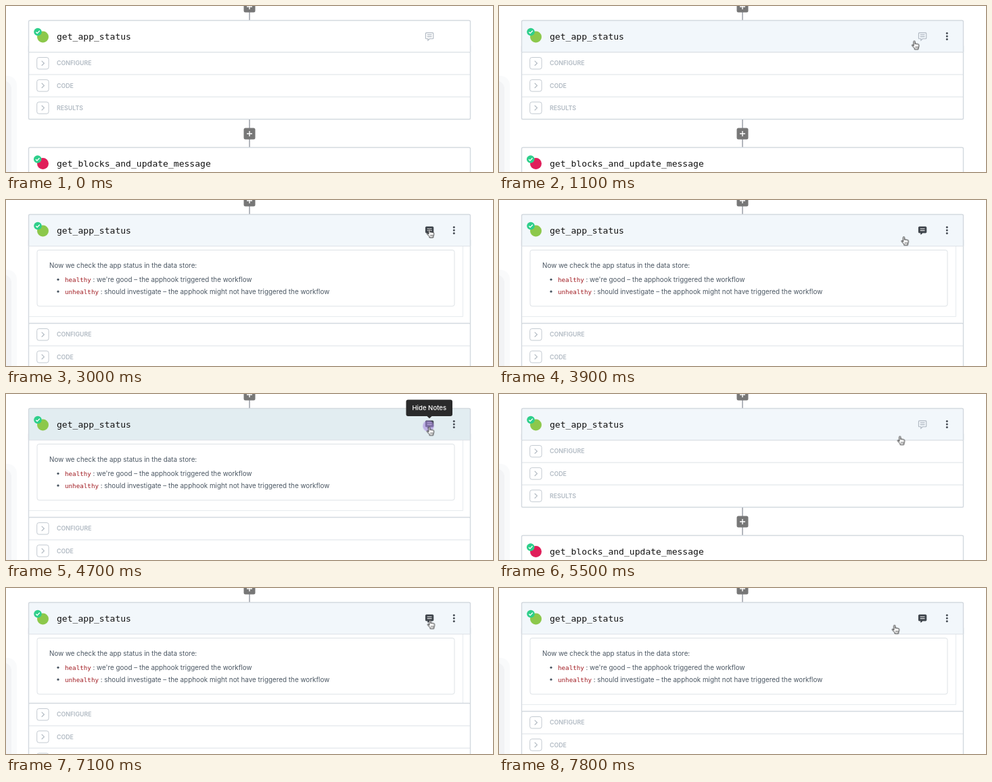
Animation of 720 by 247 pixels, one loop 8 s. Source, as an HTML page:

```html
<!DOCTYPE html>
<html lang="en">
<head>
<meta charset="utf-8">
<title>Step notes toggle</title>
<style>
html, body { margin: 0; width: 100%; height: 100%; overflow: hidden; background: #fff; }
svg { display: block; width: 720px; height: 247px; }
text { font-family: Inter, Roboto, sans-serif; }
.mono { font-family: "DejaVu Sans Mono", "Noto Sans Mono", monospace; }
.title { font-size: 13.06px; fill: #111; }
.label { font-size: 8.8px; font-weight: 600; fill: #b1bac3; }
.note { font-size: 9.85px; fill: #4b5763; }
.code { font-size: 9.24px; fill: #a11c22; }
.tip text { font-size: 9.6px; font-weight: 500; fill: #fff; text-anchor: middle; }
.tip rect, .tip path { fill: #2a2a2b; }
.card { fill: #fff; stroke: #d3d9df; stroke-width: 1.4; }
.rule { stroke: #dce1e6; }
.link { stroke: #9a9fa7; stroke-width: 1.5; }
.plus rect { fill: #777; }
.plus path { stroke: #fff; stroke-width: 1.4; }
.line { fill: none; stroke: #c3cad1; }

/* 100 ms is 1.25% of the loop */
.header, .rows, .closed, .open, .kebab, .press, .show, .hide, .cursor {
  animation: 8s step-end infinite;
}
.header { animation-name: header; }
.rows { animation-name: rows; }
.closed { animation-name: closed; }
.open { animation-name: open; }
.kebab { animation-name: kebab; }
.press { animation-name: press; }
.show { animation-name: show; }
.hide { animation-name: hide; }
.cursor { animation-name: cursor; animation-timing-function: steps(6); }

@keyframes header {
  0% { fill: #fff; }
  3.75%, 27.5%, 61.25%, 87.5%, 100% { fill: #f2f7fb; }
  25%, 58.75%, 85% { fill: #e2edf1; }
}
@keyframes rows {
  0%, 63.75% { transform: translateY(0); }
  27.5%, 87.5% { transform: translateY(60px); }
  28.75%, 88.75% { transform: translateY(103px); }
  30%, 90%, 100% { transform: translateY(115px); }
  61.25% { transform: translateY(55px); }
  62.5% { transform: translateY(12px); }
}
@keyframes closed {
  0%, 61.25% { opacity: 1; }
  27.5%, 87.5%, 100% { opacity: 0; }
}
@keyframes open {
  0%, 61.25% { opacity: 0; }
  27.5%, 87.5%, 100% { opacity: 1; }
}
@keyframes kebab {
  0% { opacity: 0; }
  3.75%, 100% { opacity: 1; }
}
@keyframes press {
  0%, 27.5%, 61.25%, 87.5%, 100% { opacity: 0; }
  25%, 58.75%, 85% { opacity: .6; }
}
@keyframes show {
  0%, 27.5%, 87.5%, 100% { opacity: 0; }
  15%, 78.75% { opacity: 1; }
}
@keyframes hide {
  0%, 61.25%, 100% { opacity: 0; }
  51.25% { opacity: 1; }
}
@keyframes cursor {
  0% { transform: translate(760px, 59px); animation-timing-function: step-end; }
  2.5% { transform: translate(701px, 59px); animation-timing-function: steps(5); }
  8.75%, 10% { transform: translate(598px, 60px); }
  17.5% { transform: translate(621.5px, 43px); }
  37.5% { transform: translate(621.5px, 43px); animation-timing-function: steps(5); }
  43.75%, 45% { transform: translate(567px, 60px); }
  52.5% { transform: translate(621.5px, 48.5px); }
  67.5% { transform: translate(621.5px, 48.5px); animation-timing-function: step-end; }
  68.75% { transform: translate(588.5px, 62.5px); animation-timing-function: step-end; }
  70%, 72.5% { transform: translate(578px, 62.5px); }
  80% { transform: translate(622.5px, 47.5px); }
  90% { transform: translate(622.5px, 47.5px); animation-timing-function: steps(4); }
  95% { transform: translate(583px, 56px); animation-timing-function: step-end; }
  96.25% { transform: translate(581.5px, 55.2px); animation-timing-function: step-end; }
  97.5%, 100% { transform: translate(580.5px, 54.8px); }
}
</style>
</head>
<body>
<svg viewBox="0 0 720 247" xmlns="http://www.w3.org/2000/svg">
  <defs>
    <g id="plus" class="plus">
      <rect x="-8.5" y="-8.5" width="17" height="17" rx="2.5"/>
      <path d="M-4 0H4M0-4V4"/>
    </g>
    <g id="check">
      <circle r="5.8" fill="#2ecf8b"/>
      <path d="M-2.7 .2L-.8 2.1 2.8-1.8" fill="none" stroke="#fff" stroke-width="1.4"/>
    </g>
    <g id="toggle" class="line">
      <rect x="45.7" y="-8.7" width="17.4" height="17.4" rx="3"/>
      <path d="M52.7-3.6L56.4 0 52.7 3.6" stroke="#b4bcc4" stroke-width="1.2"/>
    </g>
    <path id="bubble" d="M621.4 39.9H630.8Q631.8 39.9 631.8 40.9V47.8Q631.8 48.8 630.8 48.8H626.3L623.8 51.2V48.8H621.4Q620.4 48.8 620.4 47.8V40.9Q620.4 39.9 621.4 39.9Z"/>
    <path id="lines" d="M622.7 42.9H629.5M622.7 45.6H629.5"/>
  </defs>

  <rect x="-40" y="104" width="56" height="180" rx="14" fill="#f9fafb"/>
  <rect x="-40" y="111" width="48" height="180" rx="12" fill="#f2f3f5"/>

  <!-- notes, uncovered as the rows slide down -->
  <rect class="card" x="33.5" y="60" width="653" height="126"/>
  <path d="M675.5 69V173.5H34" fill="none" stroke="#e7ebee"/>
  <rect x="46" y="74.5" width="617" height="83.5" rx="3" fill="#fff" stroke="#dde2e6"/>
  <text class="note" x="64" y="100.7">Now we check the app status in the data store:</text>
  <circle cx="77" cy="118.3" r="1.6" fill="#4b5763"/>
  <text class="mono code" x="87" y="121.7">healthy</text>
  <text class="note" x="128.5" y="121.7">: we're good – the apphook triggered the workflow</text>
  <circle cx="77" cy="136.2" r="1.6" fill="#4b5763"/>
  <text class="mono code" x="87" y="139.5">unhealthy</text>
  <text class="note" x="139.7" y="139.5">: should investigate – the apphook might not have triggered the workflow</text>

  <g class="rows">
    <rect x="30" y="69" width="660" height="300" fill="#fff"/>
    <rect class="card" x="33.5" y="68.5" width="653" height="100" rx="1.5"/>
    <path class="rule" d="M34 102H686M34 135.2H686"/>
    <use href="#toggle" y="85.2"/>
    <use href="#toggle" y="118.4"/>
    <use href="#toggle" y="151.6"/>
    <text class="label" x="75" y="88.4">CONFIGURE</text>
    <text class="label" x="75" y="121.6">CODE</text>
    <text class="label" x="75" y="154.8">RESULTS</text>
    <path class="link" d="M360 169V210"/>
    <use href="#plus" x="360" y="190"/>
    <rect class="card" x="33.5" y="210.5" width="653" height="100" rx="2"/>
    <circle cx="54.5" cy="234.5" r="8.5" fill="#e01e5a"/>
    <use href="#check" x="46.7" y="228"/>
    <text class="mono title" x="75" y="238.8">get_blocks_and_update_message</text>
  </g>

  <path class="link" d="M360 0V21"/>
  <use href="#plus" x="360" y="1"/>
  <path class="card header" d="M33.5 68.5V23.5Q33.5 21.5 35.5 21.5H684.5Q686.5 21.5 686.5 23.5V68.5"/>
  <path class="rule" d="M34 68.7H686"/>
  <circle cx="54.5" cy="46" r="8.5" fill="#8cc84b"/>
  <use href="#check" x="47" y="38.5"/>
  <text class="mono title" x="75" y="49.6">get_app_status</text>

  <g class="closed" fill="none" stroke="#aeb7c1" stroke-width="1.1">
    <use href="#bubble"/>
    <use href="#lines"/>
  </g>
  <g class="open">
    <use href="#bubble" fill="#3d434a" stroke="#3d434a"/>
    <use href="#lines" stroke="#fff"/>
  </g>
  <g class="kebab" fill="#474d55">
    <circle cx="662.3" cy="40.4" r="1.5"/>
    <circle cx="662.3" cy="45" r="1.5"/>
    <circle cx="662.3" cy="49.6" r="1.5"/>
  </g>

  <g class="tip show">
    <rect x="589.5" y="8.5" width="72.5" height="24.5" rx="3"/>
    <path d="M622.5 33H629.5L626 36.3Z"/>
    <text x="625.7" y="24.3">Show Notes</text>
  </g>
  <g class="tip hide">
    <rect x="591.5" y="8.5" width="68.5" height="24.5" rx="3"/>
    <path d="M622.5 33H629.5L626 36.3Z"/>
    <text x="625.8" y="24.3">Hide Notes</text>
  </g>

  <g class="cursor">
    <circle class="press" cx="3" cy="-.8" r="8.3" fill="#a688de"/>
    <path d="M3.2 8V1.6a1.1 1.1 0 0 1 2.2 0V5.2q0-.9 1-.8t1 1q.1-.8 1-.7t1 1q.1-.5.8-.4t.8 1V8.5q0 1.5-.9 2.6V13H4.6V11.6L1 7.6Q.4 6.7 1.2 6.2T3.2 8Z" fill="#fff" stroke="#222" stroke-width=".95" stroke-linejoin="round"/>
    <path d="M6.1 8.6V11M7.7 8.6V11M9.2 8.6V11" stroke="#222" stroke-width=".6"/>
  </g>
</svg>
</body>
</html>
```
